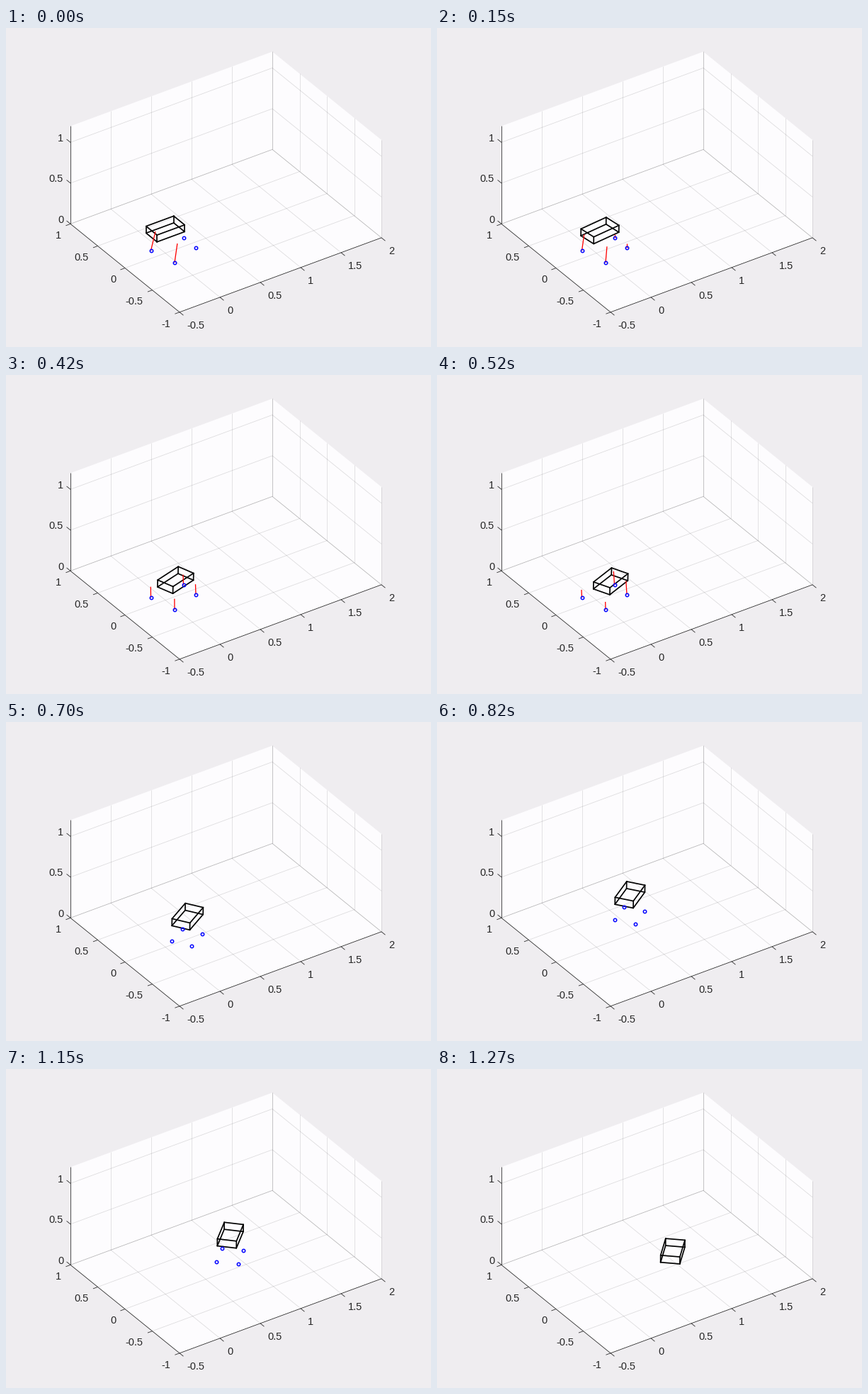
Recreate the animation shown at these times as a matplotlib script. Size 600 by 450 pixels, loop 1300 ms.

```python
import numpy as np
import matplotlib.pyplot as plt
from itertools import product
from matplotlib.animation import FuncAnimation
from matplotlib.collections import LineCollection

W, H, DPI = 600, 450, 100
PX = 72 / DPI                       # points per pixel
LOOP, TICK, STEP = 1300, 10, 30     # ms
INK = "#262626"

ORIGIN = np.array([225, 317.6])
BASIS = np.array([[114, -42], [-77, -62.25], [0, -115]])
XLIM, YLIM, ZTOP = (-0.5, 2), (-1, 1), 1.2

SIZE = np.array([0.342, 0.2, 0.084])
FOOT_REACH = np.array([0.1375, 0.1125])
LIFTOFF, LAST = 22, 42
# ground contacts on screen: rear left, rear right, front left, front right
CONTACTS = np.array([(204.5, 314), (238, 331), (250.5, 296), (268, 309.5)])


def project(x, y, z=0):
    return ORIGIN + np.array([x, y, z]) @ BASIS


fig = plt.figure(figsize=(W / DPI, H / DPI), dpi=DPI, facecolor="#efedf0")
ax = fig.add_axes([0, 0, 1, 1])
ax.set_xlim(0, W)
ax.set_ylim(H, 0)
ax.axis("off")


def segment(a, b, **style):
    style = {"color": INK, "lw": 0.8 * PX, "solid_capstyle": "butt", **style}
    ax.plot(*np.transpose([a, b]), **style)


def label(value, pos, ha):
    ax.text(pos[0], pos[1] + 5.2, f"{value:g}", ha=ha, va="baseline",
            family="Liberation Sans", size=14.5 * PX, color=INK)


def tick(pos, axis, sign):
    out = BASIS[axis] / np.hypot(*BASIS[axis])
    segment(pos, pos + sign * 7 * out)


def draw_axes():
    (x0, x1), (y0, y1) = XLIM, YLIM
    outline = [(x0, y1, ZTOP), (x1, y1, ZTOP), (x1, y0, ZTOP),
               (x1, y0, 0), (x0, y0, 0), (x0, y1, 0)]
    ax.fill(*np.transpose([project(*p) for p in outline]), color="#fdfcfe", lw=0)

    faint = {"alpha": 0.15}
    for x in (0, 0.5, 1, 1.5):
        segment(project(x, y0), project(x, y1), **faint)
        segment(project(x, y1), project(x, y1, ZTOP), **faint)
    for y in (-0.5, 0, 0.5):
        segment(project(x0, y), project(x1, y), **faint)
        segment(project(x1, y), project(x1, y, ZTOP), **faint)
    for z in (0.5, 1):
        segment(project(x0, y1, z), project(x1, y1, z), **faint)
        segment(project(x1, y1, z), project(x1, y0, z), **faint)
    segment(project(x1, y0), project(x1, y0, ZTOP), **faint)

    back = project(x1, y1)
    for end in (project(x0, y1), project(x1, y0), project(x1, y1, ZTOP)):
        segment(back, end, alpha=0.33)

    left, front, right = project(x0, y1), project(x0, y0), project(x1, y0)
    segment(left, project(x0, y1, ZTOP))
    segment(left, front)
    segment(front, right)

    for x in np.arange(x0, x1 + 0.1, 0.5):
        tick(project(x, y0), 1, -1)
        label(x, project(x, y0) + (10, 18), "left")
    for y in np.arange(y0, y1 + 0.1, 0.5):
        tick(project(x0, y), 0, -1)
        label(y, project(x0, y) + (-13, 15.5), "right")
    for z in (0, 0.5, 1):
        tick(project(x0, y1, z), 1, 1)
        label(z, project(x0, y1, z) + (-10, -7), "right")


CORNERS = np.array(list(product((-0.5, 0.5), repeat=3)))
EDGES = [(i, i | bit) for i in range(8) for bit in (1, 2, 4) if not i & bit]
FEET = np.array([(l * FOOT_REACH[0], w * FOOT_REACH[1], -0.25)
                 for l, w in product((-1, 1), (1, -1))])


def centre(k):
    """Body centre on screen: slow lean, push-off, then a ballistic hop."""
    if k >= LIFTOFF:
        rise = max(abs(k - 33.5) - 1, 0)
        return np.array([256.3 + 4.026 * (k - 23), 228.2 + 0.513 * rise ** 2])
    keys = [0, 10, 17, 20, 21]
    return np.array([np.interp(k, keys, [225, 235, 245.2, 249.6, 250.8]),
                     np.interp(k, keys, [283.5, 288, 291, 292, 290.5])])


def place(points, k):
    """Turn body points by yaw and pitch and put them on screen."""
    yaw = np.radians(np.interp(k, [0, 10, 17, 23, 27, 33, 42],
                               [0, 13.8, 23.2, 32.5, 35.6, 39.8, 47.3]))
    pitch = np.radians(np.interp(k, [0, 10, 17], [0, 1.5, 2.5]))
    c, s, cp, sp = np.cos(yaw), np.sin(yaw), np.cos(pitch), np.sin(pitch)
    frame = np.array([[cp * c, cp * s, -sp], [-s, c, 0], [sp * c, sp * s, cp]])
    return centre(k) + points @ frame @ BASIS


def forces(k):
    """Screen vectors of the ground forces, one per foot."""
    keys = [0, 10, 17, 19, 20, 21]
    rear = np.interp(k, keys, [27, 18.5, 11, 9, 32, 32])
    front = np.interp(k, keys, [0, 10.8, 19, 21, 36, 36])
    rear_lean = np.interp(k, keys, [6.5, 0, -0.5, -1, -5, -5])
    front_lean = np.interp(k, keys, [0, 0, -1.2, -1.5, -2.5, -2.5])
    return np.array([(rear_lean, -rear), (rear_lean * 0.6, -rear),
                     (front_lean, -front), (front_lean, -front)])


draw_axes()
body = LineCollection([], colors="black", linewidths=1.7 * PX,
                      capstyle="round", zorder=5)
push = LineCollection([], colors="red", linewidths=1.3 * PX,
                      capstyle="butt", zorder=6)
ax.add_collection(body)
ax.add_collection(push)
feet, = ax.plot([], [], "o", ms=4.4 * PX, mfc="none", mec="blue",
                mew=1.5 * PX, zorder=7)


def update(i):
    t = i * TICK
    k = (t if t < 420 else t - 10) // STEP    # one step lasts 40 ms
    box = place(CORNERS * SIZE, k)
    body.set_segments([box[list(e)] for e in EDGES])

    grounded = k < LIFTOFF
    spots = CONTACTS if grounded else place(FEET, k)
    arrows = np.stack([CONTACTS, CONTACTS + forces(k)], axis=1)
    push.set_segments(arrows)
    push.set_visible(grounded)
    feet.set_data(*spots.T)
    feet.set_visible(k < LAST)
    return body, push, feet


anim = FuncAnimation(fig, update, frames=LOOP // TICK, interval=TICK,
                     repeat=True, repeat_delay=0, init_func=lambda: update(0))
plt.show()
```
